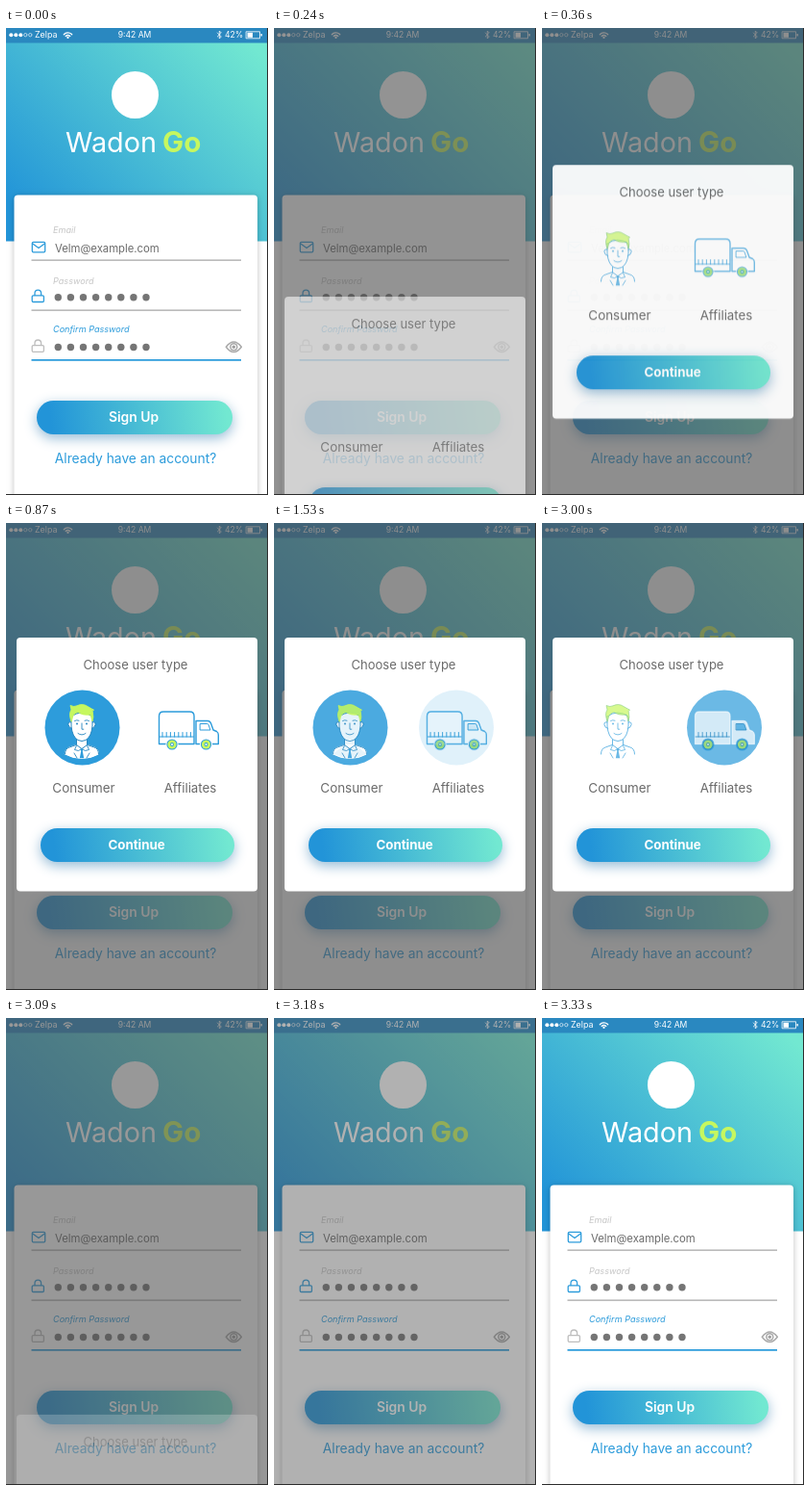
Write an HTML page with a canvas that moves like this. It is 273 px wide and 485 px high and loops after 3.6 s.

```html
<!DOCTYPE html>
<html lang="en">
<head>
<meta charset="utf-8">
<title>Sign up and choose user type</title>
<style>
  html, body { margin: 0; width: 100%; height: 100%; overflow: hidden; background: #fff; }
  canvas { display: block; width: 273px; height: 485px; }
</style>
</head>
<body>
<canvas id="stage"></canvas>
<script>
const W = 273, H = 485, LOOP = 3600, STEP = 30;
const BLUE = '#2d9cdb', GREEN = '#c6f75f', GRAY = '#6b6b6b', PALE = '#bdbdbd', EDGE = '#2c2c2c';
const FONT = 'Inter, "Open Sans", sans-serif';
const dpr = window.devicePixelRatio || 1;

function setup(canvas) {
  canvas.width = W * dpr;
  canvas.height = H * dpr;
  const c = canvas.getContext('2d');
  c.scale(dpr, dpr);
  return c;
}
const stage = setup(document.getElementById('stage'));
const sheet = document.createElement('canvas');
const modal = setup(sheet);

const clamp = v => Math.max(0, Math.min(1, v));

// Progress of a change whose first visible step is at a and last at b.
const progress = (t, a, b) =>
  clamp((Math.floor(t / STEP) * STEP - a + STEP) / (b - a + STEP));

// cubic-bezier(0, 0, .58, 1)
function easeOut(x) {
  let lo = 0, hi = 1;
  for (let i = 0; i < 20; i++) {
    const m = (lo + hi) / 2;
    if (1.74 * (1 - m) * m * m + m * m * m < x) lo = m; else hi = m;
  }
  return 3 * (1 - lo) * lo * lo + lo * lo * lo;
}

function text(c, str, x, y, size, color, style = '400', align = 'left') {
  c.font = `${style} ${size}px ${FONT}`;
  c.fillStyle = color;
  c.textAlign = align;
  c.fillText(str, x, y);
}

function box(c, x, y, w, h, r, fill) {
  c.beginPath();
  c.roundRect(x, y, w, h, r);
  c.fillStyle = fill;
  c.fill();
}

function disc(c, x, y, r, fill) {
  c.beginPath();
  c.arc(x, y, r, 0, Math.PI * 2);
  c.fillStyle = fill;
  c.fill();
}

function shape(c, d, fill, stroke, width = 1.2) {
  const p = new Path2D(d);
  if (fill) { c.fillStyle = fill; c.fill(p); }
  if (stroke) {
    c.strokeStyle = stroke;
    c.lineWidth = width;
    c.lineJoin = c.lineCap = 'round';
    c.stroke(p);
  }
}

function blend(c, x0, y0, x1, y1) {
  const g = c.createLinearGradient(x0, y0, x1, y1);
  g.addColorStop(0, '#2294d8');
  g.addColorStop(1, '#72e8d1');
  return g;
}

function shadow(c, color, blur, dy, draw) {
  c.save();
  c.shadowColor = color;
  c.shadowBlur = blur * dpr;
  c.shadowOffsetY = dy * dpr;
  draw();
  c.restore();
}

function button(c, x, y, w, label, weight, size) {
  shadow(c, 'rgba(60,130,180,.55)', 13, 4, () =>
    box(c, x, y, w, 35, 17.5, blend(c, x + 15, y + 25, x + w - 8, y)));
  text(c, label, x + w / 2 - 1, y + 22, size, '#fff', weight, 'center');
}

function statusBar(c) {
  box(c, 0, 0, W, 15.5, 0, '#2a88c0');
  for (let i = 0; i < 5; i++) {
    c.beginPath();
    c.arc(5.3 + i * 5, 7.2, i < 3 ? 2 : 1.7, 0, 7);
    c.fillStyle = c.strokeStyle = '#fff';
    c.lineWidth = 0.6;
    if (i < 3) c.fill(); else c.stroke();
  }
  text(c, 'Zelpa', 30, 10.3, 8.9, '#fff');
  for (const r of [3, 5.6]) {
    c.beginPath();
    c.arc(64.5, 10.5, r, -Math.PI * 0.77, -Math.PI * 0.23);
    c.strokeStyle = '#fff';
    c.lineWidth = 1.3;
    c.stroke();
  }
  disc(c, 64.5, 9.9, 1.1, '#fff');
  text(c, '9:42 AM', 134, 10.3, 8.6, '#fff', '400', 'center');
  shape(c, 'M220.3 5l4 4-2 2V3l2 2-4 4', null, '#fff', 0.8);
  text(c, '42%', 228, 10.3, 8.6, '#fff');
  shape(c, 'M250.5 3.8h14v7h-14z', null, '#fff', 0.8);
  box(c, 251.5, 4.8, 5.5, 5, 0, '#fff');
  box(c, 265.5, 6, 1.4, 2.6, 0.6, '#fff');
}

function lock(c, y, color) {
  shape(c, `M28.4 ${y + 6.3}h9.8q1.2 0 1.2 1.2v4.3q0 1.2-1.2 1.2h-9.8q-1.2 0-1.2-1.2v-4.3q0-1.2 1.2-1.2z` +
    `M30 ${y + 6}v-2q0-3.3 3.3-3.3t3.3 3.3v2`, null, color, 1.3);
}

function field(c, label, baseline, color, lineY, lineH, lineColor) {
  text(c, label, 49, baseline, 9.1, color, 'italic 400');
  box(c, 26.5, lineY, 218.5, lineH, 0, lineColor);
}

function dots(c, y) {
  for (let i = 0; i < 8; i++) disc(c, 54.3 + i * 13.1, y, 3.7, '#757575');
}

function form(c) {
  box(c, 0, 0, W, H, 0, '#fff');
  box(c, 0, 15, W, 206.5, 0, blend(c, 35, 215, 245, 5));
  statusBar(c);

  disc(c, 134.5, 69.5, 24.5, '#fff');
  text(c, 'Wadon', 62, 129, 28.8, '#fff', '400');
  text(c, 'Go', 163, 129, 29.5, GREEN, '700');

  shadow(c, 'rgba(0,0,0,.25)', 6, 1, () => box(c, 8.5, 173.4, 253.5, 320, 4, '#fff'));

  field(c, 'Email', 213, '#c6c6c6', 240.5, 1.2, '#a6a6a6');
  shape(c, 'M28.5 222.4h11q1.2 0 1.2 1.2v8q0 1.2-1.2 1.2h-11q-1.2 0-1.2-1.2v-8q0-1.2 1.2-1.2zM27.8 224l6.2 4.6 6.2-4.6',
    null, BLUE, 1.3);
  text(c, 'Velm@example.com', 51, 232.5, 11.3, GRAY);

  field(c, 'Password', 265.5, '#c6c6c6', 292.5, 1.2, '#a6a6a6');
  lock(c, 271.5, BLUE);
  dots(c, 279.7);

  field(c, 'Confirm Password', 316, BLUE, 344, 1.8, BLUE);
  lock(c, 323.3, PALE);
  dots(c, 331.5);
  shape(c, 'M229.3 331.3q8-10.5 16 0q-8 10.5-16 0z', null, '#a9a9a9', 1.5);
  disc(c, 237.3, 331.3, 4.2, '#a9a9a9');
  disc(c, 237.3, 331.3, 2.7, '#fff');
  disc(c, 237.3, 331.3, 1.7, '#a0a0a0');

  button(c, 32, 387, 204, 'Sign Up', '600', 13.9);
  text(c, 'Already have an account?', 135, 452, 13.8, BLUE, '400', 'center');
}

function person(c, picked) {
  if (picked) disc(c, 79.5, 212.5, 39, BLUE);
  const line = picked ? '#2787c0' : BLUE;
  // shoulders, neck, ears, face
  shape(c, 'M61.5 240q0-6 5-7.2l6.5-2.3h12l6.5 2.3q5 1.2 5 7.2q-8 4.5-17.5 4.5t-17.5-4.5z',
    '#fff', picked ? '#fff' : null, 1);
  shape(c, 'M61.5 240q0-6 5-7.2l6.5-2.3M85 230.5l6.5 2.3q5 1.2 5 7.2M73.5 225v5.5l5.5 4 5.5-4v-5.5', '#fff', line, 1);
  shape(c, 'M68 207q-3.5-1-3 2.5t4 4M90 207q3.5-1 3 2.5t-4 4', '#fff', line, 1);
  shape(c, 'M68 201v10q1 11 7 14.5q4 2 8 0q6-3.5 7-14.5v-10q-5-4-11-4t-11 4z', '#fff', line, 1);
  // hair
  shape(c, 'M68 206q-3-8 0-12l-1-4.5q4 2 7 .3q6-2.8 11 .7q5 3 6.5 3.5q-2 1-1 4t-.5 8l-2-7q-8 1-13-2.5q-4 1-5 3.5z',
    GREEN, picked ? GREEN : '#8ccf8a', 0.9);
  // features
  shape(c, 'M71.5 205.5q2-1.4 4.5-.3M82 205.2q2.5-1.1 4.5.3M79 208v6.2h1.8M75 218.5q4 3 8 0', null, line, 0.9);
  disc(c, 74, 208.6, 1, line);
  disc(c, 84, 208.6, 1, line);
  // collar and tie
  shape(c, 'M73.5 231l-2 4.5 4 1 3.5-2 3.5 2 4-1-2-4.5M71 239l3 5M87 239l-3 5', null, line, 0.9);
  shape(c, 'M77.6 234.5h2.8l-.6 2.4 1.4 7.4h-4.4l1.4-7.4z', BLUE, null);
}

function truck(c, picked) {
  if (picked) disc(c, 190, 212.5, 39, BLUE);
  const line = picked ? '#fff' : BLUE;
  const inner = picked ? '#2787c0' : BLUE;
  shape(c, 'M159.5 229.5v-29q0-4.5 4.5-4.5h27.5q4.5 0 4.5 4.5v29z', '#fff', line, 1.4);
  shape(c, 'M198 229.5v-24h12q2.5 0 3.5 2.5l2.5 7 3.5 1.5q1.8 1 1.8 3.5v9.5z', '#fff', line, 1.4);
  shape(c, 'M202.5 208.5h7.2q1 0 1.4 1.2l1.8 5.3h-10.4z', picked ? BLUE : '#fff', inner, 1);
  let ribs = 'M160 222h35.5';
  for (let x = 163; x < 195; x += 4.2) ribs += `M${x} 217.5v4.5`;
  shape(c, ribs, null, inner, 1);
  for (const x of [173, 208.5]) {
    disc(c, x, 230, 6.6, picked ? BLUE : '#fff');
    disc(c, x, 230, 5.6, inner);
    disc(c, x, 230, 4.6, GREEN);
    disc(c, x, 230, 1.9, inner);
    disc(c, x, 230, 1, '#fff');
  }
}

function option(c, draw, picked, alpha) {
  if (picked < 1) {
    c.globalAlpha = alpha;
    draw(c, false);
  }
  if (picked > 0) {
    c.globalAlpha = alpha * picked;
    draw(c, true);
  }
  c.globalAlpha = 1;
}

function chooser(c, consumer, affiliate, icons) {
  c.clearRect(0, 0, W, H);
  box(c, 11, 119, 251, 263.5, 4, '#fff');
  text(c, 'Choose user type', 135, 151.5, 13, GRAY, '400', 'center');
  option(c, person, consumer, icons);
  option(c, truck, affiliate, icons);
  text(c, 'Consumer', 81, 279.5, 13.4, GRAY, '400', 'center');
  text(c, 'Affiliates', 192, 279.5, 13.3, GRAY, '400', 'center');
  button(c, 36, 317, 202, 'Continue', '700', 13.3);
}

function render(t) {
  const enter = progress(t, 150, 420);
  const leave = progress(t, 3000, 3330);
  const first = easeOut(progress(t, 630, 870));
  const second = easeOut(progress(t, 1530, 1830));

  form(stage);

  const dim = (1 - (1 - enter) ** 6) * (1 - leave ** 2.2) * 0.64;
  if (dim > 0) box(stage, 0, 0, W, H, 0, `rgba(79,79,79,${dim})`);

  const exit = clamp((leave * 12 - 1) / 5);
  const shown = easeOut(enter) * (1 - easeOut(exit));
  if (shown > 0) {
    const icons = clamp((enter - 0.4) / 0.6) * clamp(1 - leave * 3.6);
    chooser(modal, first * (1 - second), second, icons);
    stage.globalAlpha = shown;
    stage.drawImage(sheet, 0, (1 - shown) * 373, W, H);
    stage.globalAlpha = 1;
  }
  box(stage, W - 1, 0, 1, H, 0, EDGE);
  box(stage, 0, H - 1, W, 1, 0, EDGE);
}

const start = performance.now();
function tick() {
  render((performance.now() - start) % LOOP);
  requestAnimationFrame(tick);
}
tick();
</script>
</body>
</html>
```
